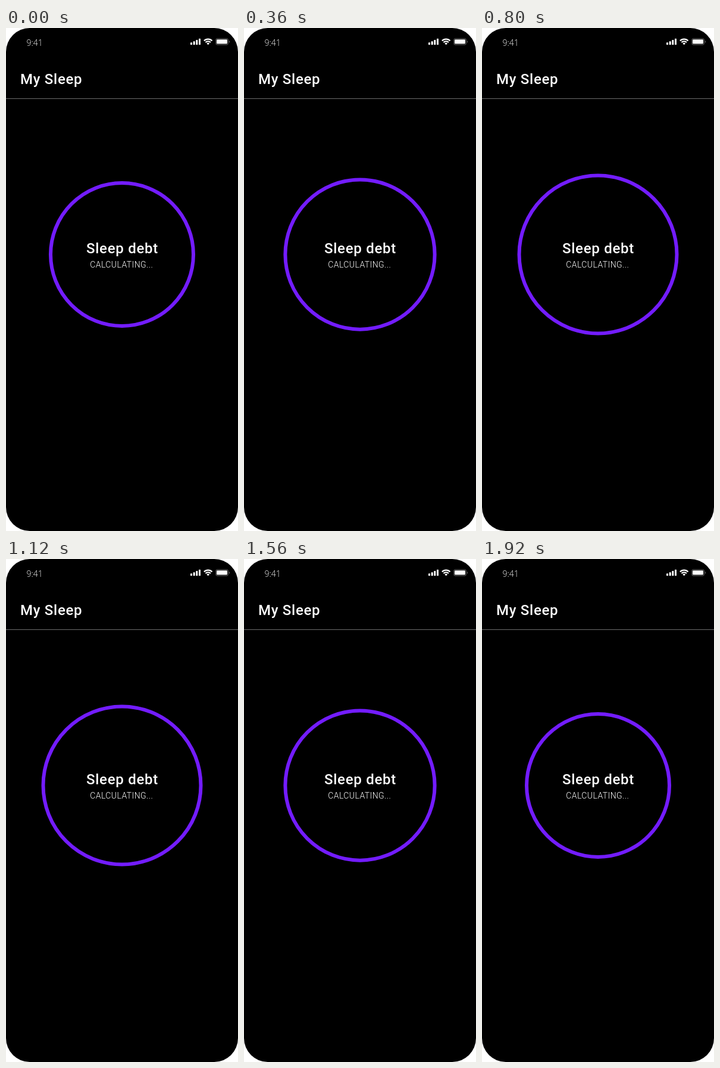
Animation, 390 px wide and 844 px high, one loop 1960 ms. Source, as an HTML page:

```html
<!DOCTYPE html>
<html lang="en">
<head>
<meta charset="utf-8">
<title>My Sleep</title>
<style>
  html, body { margin: 0; width: 100%; height: 100%; overflow: hidden; background: #fff; }
  svg { display: block; width: 390px; height: 844px; }
  text { fill: #fff; font-family: Roboto, sans-serif; letter-spacing: .03em; }
  .heading { font-size: 24px; font-weight: 500; }
  .status { font-size: 14px; font-weight: 300; }
  .clock { font: 300 14px "Open Sans", sans-serif; letter-spacing: 0; }
  .ring {
    fill: none; stroke: #731cff; stroke-width: 6;
    animation: pulse 1960ms -4ms infinite;
  }
  /* Grows for 960 ms, shrinks for 960 ms, rests for 40 ms, at 25 steps a second. */
  @keyframes pulse {
    0% { r: 120px; animation-timing-function: steps(24); }
    48.9795% { r: 135px; animation-timing-function: steps(24); }
    97.959%, 100% { r: 120px; }
  }
</style>
</head>
<body>
<svg viewBox="0 0 390 844">
  <rect width="390" height="844" rx="40"/>

  <text class="clock" x="34.5" y="30">9:41</text>
  <g fill="#fff">
    <rect x="310" y="24.3" width="3" height="4" rx=".7"/>
    <rect x="314.7" y="22.3" width="3" height="6" rx=".7"/>
    <rect x="319.3" y="20" width="3" height="8.3" rx=".7"/>
    <rect x="324" y="17.7" width="3" height="10.6" rx=".7"/>
    <path d="M339.7 28.3l-2.4-2.4a3.4 3.4 0 0 1 4.8 0z"/>
    <rect x="354" y="19.3" width="18" height="7.3" rx="1.3"/>
  </g>
  <g fill="none" stroke="#fff" stroke-width="2.2">
    <path d="M332.9 21.5a9.6 9.6 0 0 1 13.6 0"/>
    <path d="M335.5 24.1a6 6 0 0 1 8.4 0"/>
  </g>
  <g opacity=".4">
    <rect x="352.8" y="17.8" width="20.6" height="10.3" rx="2.2" fill="none" stroke="#fff"/>
    <path d="M375 21v4a2.2 2.2 0 0 0 0-4z" fill="#fff"/>
  </g>

  <text class="heading" x="24" y="94">My Sleep</text>
  <rect y="118" width="390" height="1" fill="#6b6b6b"/>

  <circle class="ring" cx="195" cy="380" r="120"/>
  <text class="heading" x="135" y="378">Sleep debt</text>
  <text class="status" x="141.3" y="402">CALCULATING...</text>
</svg>
</body>
</html>
```
